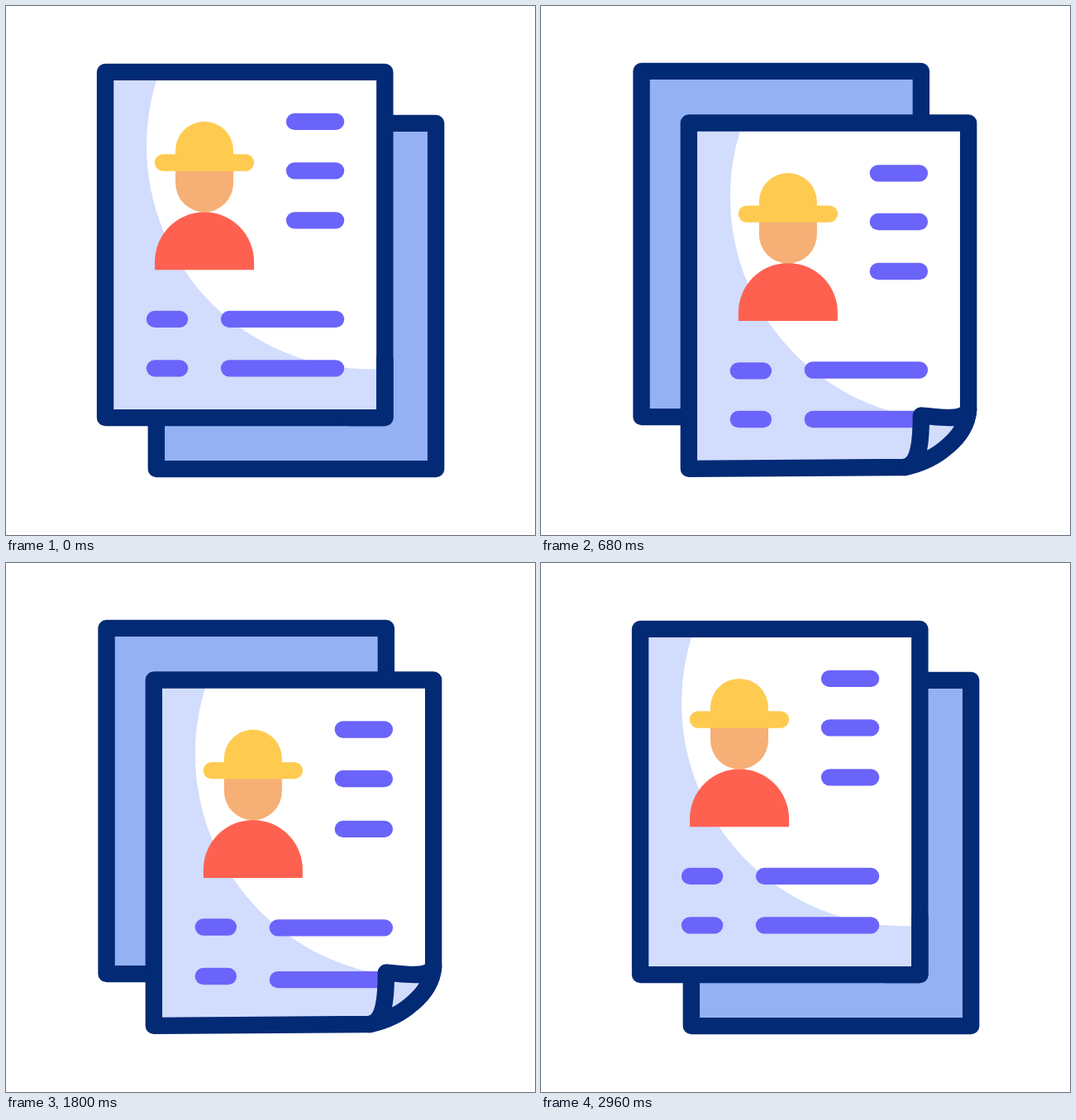
Recreate the animation shown at these times as an HTML page with a canvas. Size 640x640 px, loop 3 s.

```html
<!DOCTYPE html>
<html lang="en">
<head>
<meta charset="utf-8">
<title>Profile papers</title>
<style>
  html, body { margin: 0; height: 100%; overflow: hidden; background: #fff; }
  canvas { display: block; }
</style>
</head>
<body>
<canvas id="stage" width="640" height="640"></canvas>
<script>
const ctx = document.getElementById('stage').getContext('2d');
const LOOP = 3000, W = 338.3, H = 418.3;
const NAVY = '#032a75', PALE = '#d2dcfd', BLUE = '#94b1f3', VIOLET = '#6a64fa';
const RED = '#ff6150', SKIN = '#f6af75', YELLOW = '#fecb50';

const clamp = x => Math.min(1, Math.max(0, x));
const ease = x => { x = clamp(x); return x * x * (3 - 2 * x); };
const bump = x => ease(1 - Math.abs(2 * clamp(x) - 1));
const mix = (a, b, k) => a + (b - a) * k;
const mixAll = (a, b, k) => a.map((v, i) => mix(v, b[i], k));

// Eased value along [time, value] keys
function track(keys, t) {
  if (t <= keys[0][0]) return keys[0][1];
  for (let i = 1; i < keys.length; i++) {
    const [t0, a] = keys[i - 1], [t1, b] = keys[i];
    if (t < t1) return mix(a, b, ease((t - t0) / (t1 - t0)));
  }
  return keys[keys.length - 1][1];
}

const BAR_KEYS = [[636, 0], [920, 12.5], [1160, -22], [1488, 23.5], [1751, 0]];
const HEAD_KEYS = [[640, 0], [1100, 20], [1285, 20], [1560, -25], [1800, 0]];
const BAR_DELAY = 40;

// x start, x end, y, place in the wave
const BARS = [
  [229, 279, 60, 0], [229, 279, 119.5, 1], [229, 279, 179.5, 2],
  [60, 90, 299, 0], [60, 90, 358.5, 1],
  [150, 279, 299, 2], [150, 279, 358.5, 3]
];

// Corner curve: control, middle, control, bottom end
const OUTER_FLAT = [W, 382, W, H, 317, H];
const OUTER_BENT = [336, 372, 313, 391, 292, 410];
// Fold: two cubics from the bottom end over the tip to the right edge
const FOLD_FLAT = [296, H, 315, H, 330, H, W, H, W, 400, W, 370, W, 347];
const FOLD_BENT = [261, 416.5, 278, 414, 281, 390, 281, 354, 300, 355, 332, 362, W, 347];

function place(x, y, deg, draw) {
  ctx.save();
  ctx.translate(x, y);
  ctx.rotate(deg * Math.PI / 180);
  ctx.translate(-W / 2, -H / 2);
  draw();
  ctx.restore();
}

function paint(path, fill, stroke) {
  if (fill) { ctx.fillStyle = fill; ctx.fill(path); }
  if (stroke) { ctx.strokeStyle = stroke; ctx.lineWidth = 20.4; ctx.stroke(path); }
}

function line(x0, x1, y, color) {
  const p = new Path2D();
  p.moveTo(x0, y);
  p.lineTo(x1, y);
  paint(p, null, color);
}

// Flat-sided shape with one round end, up or down
function dome(x, y, r, flat, color, down) {
  const p = new Path2D();
  p.arc(x, y, r, Math.PI, 0, down);
  p.lineTo(x + r, flat);
  p.lineTo(x - r, flat);
  p.closePath();
  paint(p, color);
}

function addCorner(path, c, endX, endY) {
  path.quadraticCurveTo(c[0], c[1], c[2], c[3]);
  path.quadraticCurveTo(c[4], c[5], endX, endY);
  path.closePath();
}

function backPaper() {
  const p = new Path2D();
  p.rect(0, 0, W, H);
  paint(p, BLUE, NAVY);
}

function person(t) {
  dome(120, 229.5, 60, 239.5, RED);
  const nod = bump((t - 2555) / 415);
  ctx.save();
  ctx.translate(120, 169.5 + track(HEAD_KEYS, t) + 9 * nod);
  ctx.rotate(-14 * nod * Math.PI / 180);
  ctx.translate(-120, -169.5);
  dome(120, 134.5, 35, 110, SKIN, true);
  dome(120, 95, 35, 110, YELLOW);
  line(70, 170, 109.6, YELLOW);
  ctx.restore();
}

function frontPaper(t, curl) {
  const corner = mixAll(OUTER_FLAT, OUTER_BENT, clamp(curl / 0.65));
  const f = mixAll(FOLD_FLAT, FOLD_BENT, curl);

  const sheet = new Path2D();
  sheet.moveTo(W, 347);
  sheet.lineTo(W, 0);
  sheet.lineTo(0, 0);
  sheet.lineTo(0, H);
  sheet.lineTo(f[0], f[1]);
  // The corner runs from the bottom end back up to the right edge
  const back = [corner[4], corner[5], corner[2], corner[3], corner[0], corner[1]];
  addCorner(sheet, back, W, 347);

  paint(sheet, PALE);
  ctx.save();
  ctx.clip(sheet);
  const glow = new Path2D();
  glow.arc(320, 89.5, 270, 0, 7);
  paint(glow, '#fff');
  ctx.restore();
  paint(sheet, null, NAVY);

  person(t);
  for (const [x0, x1, y, step] of BARS)
    line(x0, x1, y + track(BAR_KEYS, t - step * BAR_DELAY), VIOLET);

  const fold = new Path2D();
  fold.moveTo(f[0], f[1]);
  fold.bezierCurveTo(...f.slice(2, 8));
  fold.bezierCurveTo(...f.slice(8));
  addCorner(fold, corner, f[0], f[1]);
  paint(fold, PALE, NAVY);
}

function render(t) {
  const away = clamp((t - 108) / 540), home = clamp((t - 1993) / 540);
  const k = ease(away) - ease(home);
  const spin = 9.7 * (bump(away) + bump(home));
  ctx.fillStyle = '#fff';
  ctx.fillRect(0, 0, 640, 640);
  ctx.lineCap = ctx.lineJoin = 'round';
  place(mix(351, 290.7, k), mix(351, 288, k), -spin, backPaper);
  place(mix(289.2, 348, k), mix(289, 350.7, k), spin, () => frontPaper(t, k));
}

const start = performance.now();
function tick() {
  render((performance.now() - start) % LOOP);
  requestAnimationFrame(tick);
}
tick();
</script>
</body>
</html>
```
